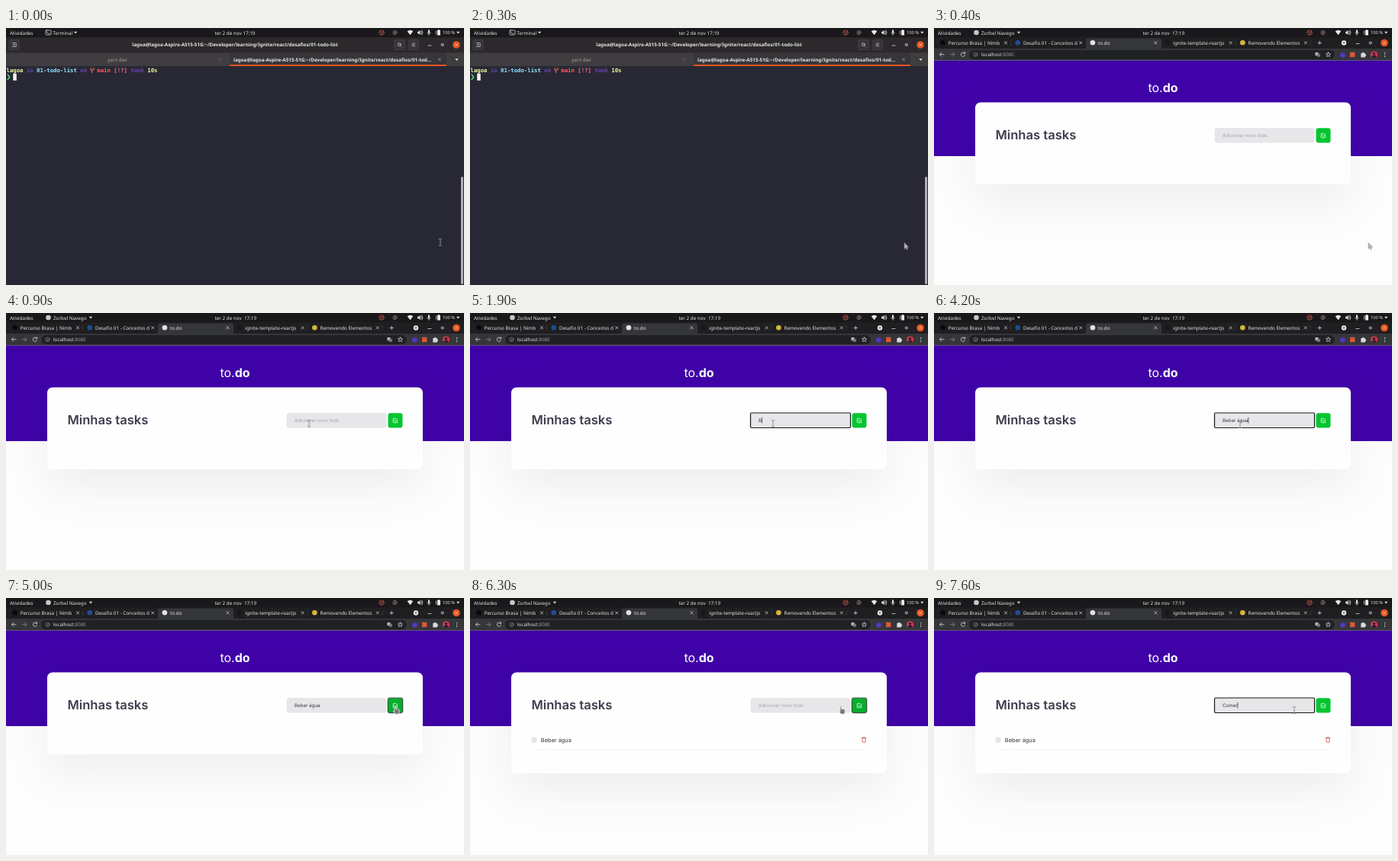
Recreate the animation shown at these times as an HTML page. Size 600 px wide and 337 px high, loop 8 s.

```html
<!DOCTYPE html>
<html lang="pt-BR">
<head>
<meta charset="utf-8">
<title>to.do</title>
<style>
  html, body { margin: 0; width: 100%; height: 100%; overflow: hidden; background: #1a181b; }
  svg { display: block; width: 100%; height: 100%; }
  text { font: 6.3px "Noto Sans", "Open Sans", sans-serif; fill: #e8e6e6; text-rendering: geometricPrecision; white-space: pre; }
  .bold { font-weight: 700; }
  .prompt text { font: 700 7.3px "DejaVu Sans Mono", "Noto Sans Mono", monospace; }
  .page text { font-family: Inter, Lato, sans-serif; }
  .line { fill: none; stroke: #d8d6d8; stroke-width: .8; stroke-linecap: round; stroke-linejoin: round; }
  .dim { stroke: #8d8a8d; }
</style>
</head>
<body>
<svg viewBox="0 0 600 337">
  <defs>
    <filter id="shadow" x="-20%" y="-60%" width="140%" height="260%">
      <feDropShadow dx="0" dy="22" stdDeviation="28" flood-color="#000" flood-opacity=".06"/>
    </filter>
    <path id="cross" class="line" d="M-1.6-1.6L1.6 1.6M1.6-1.6L-1.6 1.6"/>
    <path id="caretDown" d="M-2.2-1.2h4.4L0 1.5z" fill="#dedcdc"/>
    <g id="windowButtons">
      <path class="line" d="M553 23h4M570.8 20.8h2.4v2.4h-2.4z"/>
      <circle cx="590" cy="22" r="4.8" fill="#e95420"/>
      <use href="#cross" x="590" y="22"/>
    </g>
  </defs>

  <g id="terminal">
    <rect width="600" height="337" fill="#282834"/>
    <rect y="12" width="600" height="20.5" fill="#2c292c"/>
    <rect y="32.5" width="600" height="17.5" fill="#403d40"/>
    <rect x="293" y="32.5" width="284" height="17.5" fill="#383538"/>
    <rect x="293" y="48" width="284" height="2" fill="#e2551f"/>
    <g fill="#383538" stroke="#4a474a" stroke-width=".6">
      <rect x="4" y="15.5" width="13.5" height="13" rx="2"/>
      <rect x="508.5" y="15.5" width="14" height="13" rx="2"/>
      <rect x="527" y="15.5" width="14" height="13" rx="2"/>
    </g>
    <path class="line" stroke-opacity=".8" d="M8.3 20v-.5h5v5h-5V24M10.8 21v2M9.8 22h2M516.6 23.1l1.5 1.5M532 20.2h3.6M532 22h3.6M532 23.8h3.6"/>
    <circle class="line" cx="515.2" cy="21.6" r="1.8"/>
    <text class="bold" x="300" y="24.2" text-anchor="middle">lagoa@lagoa-Aspire-A515-51G:~/Developer/learning/Ignite/react/desafios/01-todo-list</text>
    <text x="133" y="43.6" style="fill:#a5a2a4">yarn dev</text>
    <text class="bold" x="298" y="43.6">lagoa@lagoa-Aspire-A515-51G:~/Developer/learning/Ignite/react/desafios/01-tod…</text>
    <use href="#cross" x="280" y="41.3" opacity=".25"/>
    <use href="#cross" x="568" y="41.3" opacity=".6"/>
    <use href="#caretDown" x="590.5" y="41.5"/>
    <use href="#windowButtons"/>
    <g id="prompt" class="prompt"></g>
    <path class="line" style="stroke:#ff5b4d;stroke-width:1.1" d="M111 52.5l1.8 6M111.8 56l3.2-1.6v-2.2"/>
    <path class="line" style="stroke:#5af78e;stroke-width:1.3" d="M2.2 61.2l2.6 3.2-2.6 3.2"/>
    <rect x="9.3" y="59.8" width="4.5" height="9" fill="#f8f8f4"/>
    <rect x="596" y="195" width="3" height="141" rx="1.5" fill="#b2b0b5"/>
  </g>

  <g id="browser">
    <rect y="12" width="600" height="16" fill="#1f1e20"/>
    <path d="M196 27.5q3 0 3-3V16q0-2.5 2.5-2.5h94q2.5 0 2.5 2.5v8.5q0 3 3 3z" fill="#35363a"/>
    <rect y="27" width="600" height="16" fill="#35363a"/>
    <rect x="46" y="29" width="479" height="12" rx="6" fill="#202124"/>
    <g id="tabs"></g>
    <path class="line" d="M503 19.5h4.4M505.2 17.3v4.4"/>
    <circle cx="537" cy="19.5" r="3.2" fill="#e6e6e6"/>
    <path d="M535.4 18.8h3.2l-1.6 2z" fill="#333"/>
    <use href="#windowButtons" y="-2.5"/>
    <path class="line" d="M13 34.7H7.5M10 32.2l-2.5 2.5 2.5 2.5M40.2 33A2.7 2.7 0 1 0 40.6 35.6M40.7 31.6v1.9h-1.9"/>
    <path class="line dim" d="M21.5 34.7H27M24.5 32.2l2.5 2.5-2.5 2.5"/>
    <circle class="line dim" cx="54.5" cy="34.8" r="2.5"/>
    <path class="line dim" d="M54.5 34.6v1.4"/>
    <text x="62" y="37.1">localhost<tspan fill="#9a9ca0">:8080</tspan></text>
    <rect x="499.5" y="32" width="4" height="4.2" fill="#b8babd"/>
    <rect x="502" y="33.8" width="3.8" height="4" fill="#77797d"/>
    <path class="line" d="M516.5 31.8l.9 2 2.1.2-1.6 1.4.5 2.1-1.9-1.1-1.9 1.1.5-2.1-1.6-1.4 2.1-.2z"/>
    <circle cx="535.5" cy="35.5" r="3.3" fill="#5a35c8"/>
    <rect x="545" y="31.8" width="6.4" height="6.4" fill="#d9573c"/>
    <path d="M559.3 33h1.7a1.2 1.2 0 0 1 2.4 0h1.5v1.6a1.2 1.2 0 0 1 0 2.4v1.4h-5.6z" fill="#d5d7da"/>
    <circle cx="576.5" cy="35" r="4.6" fill="#d8344d"/>
    <path d="M573.5 38.3q0-2.8 3-2.8t3 2.8a4.6 4.6 0 0 1-6 0z" fill="#26222c"/>
    <circle cx="576.5" cy="33.6" r="1.7" fill="#26222c"/>
    <path d="M590 32h1.2v1.2H590zM590 34.4h1.2v1.2H590zM590 36.8h1.2V38H590z" fill="#d5d7da"/>

    <g class="page">
      <rect y="42.7" width="600" height="295" fill="#fdfdfd"/>
      <rect y="42.7" width="600" height="125.3" fill="#3f02a8"/>
      <text x="300" y="83.5" text-anchor="middle" style="font-size:16px;fill:#fff">to.<tspan font-weight="700">do</tspan></text>
      <rect id="card" x="54" y="97.5" width="492" height="107.5" rx="7" fill="#fefefe" filter="url(#shadow)"/>
      <text x="80.5" y="146.3" style="font-size:16.6px;font-weight:600;fill:#3d3d4d">Minhas tasks</text>
      <rect id="field" x="367.5" y="131" width="131" height="19.5" fill="#e7e7ea"/>
      <text id="entry" x="378" y="142.9" style="font-size:6.2px"></text>
      <rect id="caret" y="136.8" width=".7" height="7.8" fill="#222"/>
      <rect id="button" x="500.5" y="131.2" width="19" height="19.2" rx="3"/>
      <rect id="ring" x="500.3" y="131" width="19.4" height="19.6" rx="2.5" fill="none" stroke="#10200f" stroke-width="1.2" stroke-dasharray="1.4 .5"/>
      <path class="line" style="stroke:#fff" d="M512.6 141v2.3q0 .5-.5.5h-4.4q-.5 0-.5-.5v-4.4q0-.5.5-.5h3.2M508.7 140.8l1.4 1.4 3-3.3"/>
      <g id="task">
        <rect x="80.5" y="182.7" width="7" height="7" rx="1.4" fill="#e6e6e9"/>
        <text x="92.8" y="188.7" style="font-size:7.4px;fill:#33333d">Beber água</text>
        <path class="line" style="stroke:#cf4a4a" d="M513.2 183.7h5.6M514 183.9v4.7q0 .6.6.6h2.8q.6 0 .6-.6v-4.7M514.9 183.5v-.9h2.2v.9"/>
        <path d="M80.5 199H520" stroke="#ececf1" stroke-width=".7"/>
      </g>
    </g>
  </g>

  <g id="topBar">
    <rect width="600" height="12.3" fill="#1a181b"/>
    <text x="5" y="8.5">Atividades</text>
    <g id="terminalMenu">
      <rect class="line" x="52" y="3" width="7" height="6" rx="1"/>
      <path class="line" d="M53.5 4.8l1.2 1-1.2 1M55.7 7.2h1.5"/>
      <text x="61.3" y="8.5">Terminal</text>
      <use href="#caretDown" x="91" y="6"/>
    </g>
    <g id="browserMenu">
      <circle cx="55.5" cy="6" r="3.3" fill="#c9c7c9"/>
      <text x="62" y="8.5">Zorbel Navego</text>
      <use href="#caretDown" x="111" y="6"/>
    </g>
    <text id="clock" x="273.5" y="8.5"></text>
    <circle class="line" style="stroke:#d9544c" cx="492" cy="6" r="3.2"/>
    <path class="line" style="stroke:#d9544c" d="M490 4.5l2 1.5 2.5-1.5M492 6v2.5"/>
    <circle class="line dim" cx="509.5" cy="6" r="2.8" stroke-opacity=".7"/>
    <path class="line dim" d="M509.5 3.6v4.8M507.8 7l3.4-2"/>
    <path d="M525.7 4.2q3.8-3 7.6 0l-3.8 5zM539 4.8h1.5l2-1.8v6l-2-1.8H539z" fill="#e8e6e6"/>
    <path class="line" d="M543.7 4q1.3 2 0 4M545 3q2 3 0 6M552 5.8q0 2 2 2t2-2M554 8v1.4"/>
    <rect x="553" y="2.2" width="2" height="4.6" rx="1" fill="#e8e6e6"/>
    <path d="M566 2.2h2v.8h1v6.4h-4V3h1z" fill="#e8e6e6"/>
    <path class="line" d="M563.5 4v4"/>
    <text x="572" y="8.4" style="font-size:5.7px">100 %</text>
    <use href="#caretDown" x="592.3" y="6"/>
  </g>

  <g id="pointer">
    <path id="beam" fill="none" stroke="#8c8c90" stroke-width="1" d="M-2.2-4.5Q0-4.5 0-3.4Q0-4.5 2.2-4.5M0-3.4V3.4M-2.2 4.5Q0 4.5 0 3.4Q0 4.5 2.2 4.5"/>
    <path id="arrow" d="M0 .5v8.2l1.9-1.7 1.3 2.8 1.2-.6-1.3-2.7h2.5z" fill="#b4b4b8" stroke="#8a8a90" stroke-width=".5"/>
    <path id="hand" d="M-2-5q1.1-.9 1.7.2v3l3.5.8q1.2.4 1.1 1.7l-.6 4.5H-.8L-3.5 1.8q-.3-1.1 1.5-.4z" fill="#777" stroke="#f2f2f2" stroke-width=".8"/>
  </g>
</svg>
<script>
const LOOP = 8000, STEP = 100;
const $ = id => document.getElementById(id);
const show = (id, visible) => $(id).style.display = visible ? '' : 'none';
const latest = (list, t) => list.findLast(item => item[0] <= t);

// column, colour, text
const COLUMN = 4.4;
$('prompt').innerHTML = [
  [0, '#f3f99d', 'lagoa'], [6, '#5f4a9c', 'in'], [9, '#8be9fd', '01-todo-list'],
  [22, '#6c45b4', 'on'], [27, '#ff5b55', 'main'], [32, '#ff6a8e', '[!?]'],
  [37, '#6c45b4', 'took'], [42, '#f3f99d', '10s']
].map(([col, fill, text]) => `<text x="${.5 + col * COLUMN}" y="58" style="fill:${fill}">${text}</text>`).join('');

$('tabs').innerHTML = [
  ['#09090a', 'Percurso Brasa | Nimb'], ['#1d4f91', 'Desafio 01 - Conceitos d'],
  ['#e2e2e2', 'to.do'], ['#17161a', 'ignite-template-reactjs'], ['#d6b73c', 'Removendo Elementos']
].map(([fill, text], i) => {
  const x = 11.5 + i * 98.2;
  return `<circle cx="${x}" cy="19.3" r="3.3" fill="${fill}"/><text x="${x + 7.2}" y="21.6">${text}</text>
    <use href="#cross" x="${x + 82.5}" y="19.4"/>`
    + (i === 0 || i > 2 ? `<path d="M${x + 89} 16v7" stroke="#47464a" stroke-width=".6"/>` : '');
}).join('');

// time, x, y, pointer shape from then on
const path = [
  [0, 569, 281, 'beam'], [300, 569, 281, 'arrow'], [400, 569, 281, 'arrow'],
  [800, 412, 156, 'arrow'], [900, 397, 145, 'beam'], [4100, 397, 145, 'beam'],
  [4200, 401, 146, 'beam'], [4900, 504, 147, 'hand'], [5000, 511, 147, 'hand'],
  [5700, 511, 147, 'hand'], [5900, 509, 148, 'hand'], [6200, 509, 148, 'hand'],
  [6300, 487, 147, 'hand'], [6400, 481, 147, 'beam'], [6800, 472, 147, 'beam'], [LOOP, 472, 147, 'beam']
];
const typing = [
  [0, ''], [1200, ''], [1900, 'B'], [2500, 'Be'], [2600, 'Beb'], [2700, 'Bebe'], [2900, 'Beber'],
  [3100, 'Beber '], [3600, 'Beber á'], [3700, 'Beber águ'], [3800, 'Beber água'],
  [5100, ''], [6800, ''], [7300, 'C'], [7500, 'Com'], [7600, 'Comer']
];

function drawPointer(t) {
  const i = path.findLastIndex(key => key[0] <= t);
  const [t0, x0, y0, shape] = path[i];
  const [t1, x1, y1] = path[i + 1];
  const k = (t - t0) / (t1 - t0);
  $('pointer').setAttribute('transform', `translate(${x0 + (x1 - x0) * k} ${y0 + (y1 - y0) * k})`);
  for (const id of ['beam', 'arrow', 'hand']) show(id, id === shape);
}

function drawField(t) {
  const focused = t >= 1200 && t < 5000 || t >= 6800;
  const [since, value] = latest(typing, t);
  const field = $('field'), entry = $('entry');
  field.setAttribute('rx', focused ? 1.4 : 3.5);
  field.setAttribute('stroke', focused ? '#18181c' : 'none');
  field.setAttribute('stroke-width', 1.2);
  entry.textContent = value || 'Adicionar novo todo';
  entry.style.fill = value ? '#33333a' : '#a0a0aa';
  $('caret').setAttribute('x', 378 + (value ? entry.getComputedTextLength() : 0));
  show('caret', focused && (t - since) % 1000 < 500);
}

function draw(now) {
  const t = Math.floor(now % LOOP / STEP) * STEP;
  const browsing = t >= 400, added = t >= 5100;
  for (const id of ['terminal', 'terminalMenu']) show(id, !browsing);
  for (const id of ['browser', 'browserMenu']) show(id, browsing);
  $('clock').textContent = browsing ? 'ter 2 de nov  17:19' : 'ter 2 de nov 17:19';
  if (browsing) drawField(t);
  show('task', added);
  $('card').setAttribute('height', added ? 132.5 : 107.5);
  $('button').setAttribute('fill', t >= 4900 && t < 6400 ? '#05ae2d' : '#04c52f');
  show('ring', t >= 5000 && t < 6800);
  drawPointer(t);
}

const start = performance.now();
function tick() {
  draw(performance.now() - start);
  requestAnimationFrame(tick);
}
tick();
</script>
</body>
</html>
```
